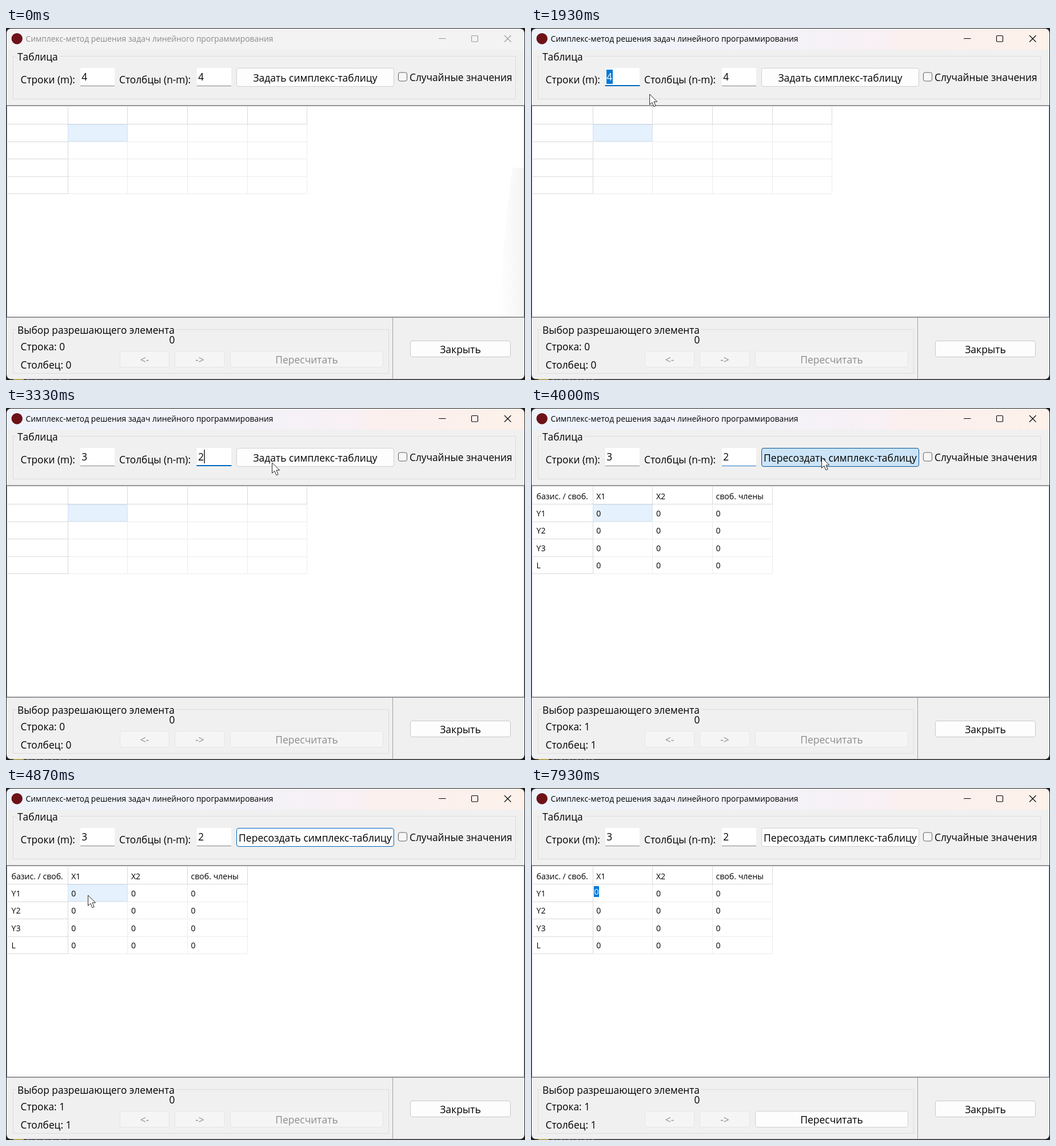
These frames come from a looping animation (908x617 px, 8000 ms). An HTML page:

```html
<!DOCTYPE html>
<html lang="ru">
<head>
<meta charset="utf-8">
<title>Симплекс-метод</title>
<style>
html, body { margin: 0; width: 100%; height: 100%; overflow: hidden; background: #202020; }
svg { display: block; width: 908px; height: 617px; }
text { font-family: "Open Sans", "Noto Sans", sans-serif; white-space: pre; }
</style>
</head>
<body>
<svg id="stage" viewBox="0 0 908 617" xmlns="http://www.w3.org/2000/svg">
  <defs>
    <linearGradient id="mica">
      <stop offset="0" stop-color="#eef3fb"/>
      <stop offset=".5" stop-color="#f4f2f8"/>
      <stop offset=".68" stop-color="#f8f0f4"/>
      <stop offset=".7" stop-color="#fbefef"/>
      <stop offset="1" stop-color="#fdf1ea"/>
    </linearGradient>
    <linearGradient id="shade">
      <stop offset="0" stop-color="#fff"/>
      <stop offset="1" stop-color="#f4f4f4"/>
    </linearGradient>
    <clipPath id="frame"><rect x="1" y="1" width="906" height="614.5" rx="8"/></clipPath>
  </defs>
  <g id="backdrop"></g>
  <g id="window" clip-path="url(#frame)"></g>
  <g id="pointer"></g>
</svg>
<script>
const LOOP = 8000, STEP = 200 / 3;
const BIG = 17.3, CAPTION = 17.5, SMALL = 14.1, TITLE = 13.86;
const BLUE = '#0067c0', SELECT = '#0078d7';
const byId = id => document.getElementById(id);

// Moments of the user's actions, ms
const AT = {
  show: 65, activate: 1000, dragOne: 1530, selectOne: 1600, dropOne: 1800, typeRows: 2400,
  focusTwo: 2730, selectTwo: 3000, typeCols: 3265, hover: 3390, press: 3865,
  build: 3930, release: 4065, edit: 7195, caretOff: 7730, hide: 7930
};

// Pointer path: time, x, y
const PATH = [
  [67, 400, 17], [330, 340, 47], [600, 228, 88], [867, 154, 85], [933, 150, 84],
  [1467, 150, 84], [1600, 126, 86], [1733, 105, 92], [1933, 207, 115], [2130, 262, 117],
  [2333, 304, 100], [2400, 304, 100], [2600, 342, 85], [2733, 362, 84], [2900, 362, 84],
  [3133, 321, 88], [3200, 321, 88], [3267, 400, 93], [3333, 465, 95], [3600, 508, 86],
  [4067, 508, 86], [4667, 198, 203], [4867, 143, 187]
];

const clamp = v => Math.max(0, Math.min(1, v));
const ramp = (t, start, span) => clamp((t - start) / span);

function mix(a, b, k) {
  const part = (c, i) => parseInt(c.slice(i, i + 2), 16);
  return `rgb(${[1, 3, 5].map(i => Math.round(part(a, i) + (part(b, i) - part(a, i)) * k))})`;
}

function pointerAt(t) {
  const i = PATH.findIndex(p => p[0] > t);
  if (i < 0) return PATH[PATH.length - 1].slice(1);
  if (i === 0) return PATH[0].slice(1);
  const [t0, x0, y0] = PATH[i - 1], [t1, x1, y1] = PATH[i], k = (t - t0) / (t1 - t0);
  return [x0 + (x1 - x0) * k, y0 + (y1 - y0) * k];
}

const rect = (x, y, w, h, fill, extra = '') =>
  `<rect x="${x}" y="${y}" width="${w}" height="${h}" fill="${fill}" ${extra}/>`;
const path = (d, stroke, width = 1, extra = '') =>
  `<path d="${d}" fill="none" stroke="${stroke}" stroke-width="${width}" ${extra}/>`;
const label = (x, y, s, size = BIG, fill = '#000', anchor = 'start') =>
  `<text x="${x}" y="${y}" font-size="${size}" fill="${fill}" text-anchor="${anchor}">${s.replace('<', '&lt;').replace('>', '&gt;')}</text>`;

function button(x, y, w, h, caption, look = {}) {
  const { fill = '#fdfdfd', border = '#d0d0d0', ink = '#000' } = look;
  return rect(x + .5, y + .5, w - 1, h - 1, fill, `rx="3.5" stroke="${border}"`)
    + label(x + w / 2, y + h / 2 + 7, caption, CAPTION, ink, 'middle');
}

function group(x, y, w, h, gapEnd, caption) {
  return path(`M18 ${y}H${x}V${y + h}H${x + w}V${y}H${gapEnd}`, '#dcdcdc') + label(20, y + 7.5, caption);
}

function field(x, value, { focus = false, selected = false, caret = false, line } = {}) {
  return rect(x, 70, 60, 32, '#fff')
    + (focus ? rect(x - .5, 100, 61, 2, BLUE) : rect(x, 101, 60, 1, line || '#868686'))
    + (selected ? rect(x + 2, 73, 11, 25, SELECT) : '')
    + label(x + 2.3, 92, value, BIG, selected ? '#fff' : '#000')
    + (caret ? rect(x + 12.5, 73, 1.3, 24, '#000') : '');
}

function titleBar(active) {
  const ink = active ? '#000' : '#999';
  return rect(0, 0, 908, 38, active ? 'url(#mica)' : '#f3f3f3')
    + '<circle cx="19.2" cy="18.7" r="9.7" fill="#6e1219"/>'
    + label(34.5, 24.3, 'Симплекс-метод решения задач линейного программирования', TITLE, active ? '#000' : '#8c8c8c')
    + path('M757 18.5H769.5', ink)
    + `<rect x="814.5" y="13.5" width="11" height="10.5" rx="1.2" fill="none" stroke="${ink}" stroke-width="1.1"/>`
    + path('M872 13L883.5 24.5M883.5 13L872 24.5', ink, 1.1);
}

function table(t) {
  const built = t >= AT.build, editing = t >= AT.edit;
  const cols = built ? 4 : 5;
  const colX = i => Math.floor(3.6 + i * 104.6) + .5;
  const rowY = i => Math.round(138 + i * 30.4) + .5;
  const right = colX(cols), bottom = rowY(5);
  let out = rect(1.5, 136.5, 905, 370, '#fff', 'stroke="#828790"');
  if (t < AT.activate)
    out += '<path d="M906 245H886Q868 380 862 506H906Z" fill="url(#shade)"/>';
  for (let r = 1; r <= 5; r++)
    out += path(`M108 ${rowY(r)}H${right}`, r === 1 ? '#d9d9d9' : '#ececec')
      + path(`M3 ${rowY(r)}H108`, '#d9d9d9');
  for (let c = 1; c <= cols; c++)
    out += path(`M${colX(c)} 168V${bottom}`, c === 1 ? '#d9d9d9' : '#ececec')
      + path(`M${colX(c)} 138V169`, '#d9d9d9');
  if (!editing) out += rect(108.5, 169.5, 103.5, 29, '#e5f1fd', 'stroke="#cfe4f7"');
  if (!built) return out;

  const heads = ['базис. / своб.', 'X1', 'X2', 'своб. члены'];
  const sides = ['Y1', 'Y2', 'Y3', 'L'];
  const cellX = c => 9.5 + c * 104.7;
  heads.forEach((s, c) => out += label(cellX(c), 159.7, s, SMALL));
  sides.forEach((s, r) => {
    const y = 190 + r * 30.4;
    out += label(cellX(0), y, s, SMALL);
    for (let c = 1; c < 4; c++)
      if (!editing || r || c > 1) out += label(cellX(c), y, '0', SMALL);
  });
  if (editing) {
    out += rect(110, 172, 9, 19, SELECT) + label(110.5, 187, '0', SMALL, '#fff');
    if (t < AT.caretOff) out += rect(118, 171.5, 1.2, 19.5, '#000');
  }
  return out;
}

function mainButton(t) {
  const caption = t >= AT.build ? 'Пересоздать симплекс-таблицу' : 'Задать симплекс-таблицу';
  const hover = ramp(t, AT.hover, 200), calm = ramp(t, AT.release, 220);
  let fill = mix('#fdfdfd', '#e0eef9', hover), border = mix('#d0d0d0', '#0078d4', hover);
  if (t >= AT.press) { fill = '#cce4f7'; border = '#005499'; }
  if (t >= AT.release) { fill = mix('#cce4f7', '#fdfdfd', calm); border = mix('#005499', '#0067c0', calm); }
  if (t >= AT.edit) border = mix('#0067c0', '#d0d0d0', ramp(t, AT.edit, 200));
  return button(403, 70, 276, 33, caption, { fill, border });
}

function topPanel(t) {
  const inOne = t >= AT.activate && t < AT.focusTwo;
  const inTwo = t >= AT.focusTwo && t < AT.build;
  const rows = t < AT.typeRows ? '4' : '3', columns = t < AT.typeCols ? '4' : '2';
  const one = {
    focus: inOne,
    selected: t >= AT.selectOne && t < AT.typeRows,
    caret: inOne && (t < AT.dragOne || t >= AT.typeRows)
  };
  const two = {
    focus: inTwo,
    selected: t >= AT.selectTwo && t < AT.typeCols,
    caret: inTwo && (t < AT.selectTwo || t >= AT.typeCols && t < 3800),
    line: t >= AT.build ? mix('#2b78c0', '#868686', ramp(t, AT.build + 70, 130)) : ''
  };
  return rect(0, 38, 908, 98, '#f0f0f0')
    + group(12.5, 49.5, 879, 75, 93, 'Таблица')
    + label(25.5, 97, 'Строки (m):') + field(130, rows, one)
    + label(198, 97, 'Столбцы (n-m):') + field(334, columns, two)
    + mainButton(t)
    + rect(686.5, 78, 15, 15, '#f7f7f7', 'rx="3" stroke="#626262"')
    + label(706, 93, 'Случайные значения')
    + path('M1 135.5H907', '#a0a0a0');
}

function bottomPanel(t) {
  const index = t >= AT.build ? 1 : 0, on = ramp(t, AT.edit - 65, 270);
  const off = { fill: '#f5f5f5', border: '#e6e6e6', ink: '#8d8d8d' };
  const recount = {
    fill: mix('#f5f5f5', '#fdfdfd', on),
    border: mix('#e6e6e6', '#d0d0d0', on),
    ink: on > 0 ? '#000' : off.ink
  };
  return rect(0, 507, 908, 110, '#f0f0f0')
    + path('M1 507.5H907', '#a0a0a0')
    + path('M676.5 508V615', '#a0a0a0')
    + group(12.5, 528.5, 657, 77, 297, 'Выбор разрешающего элемента')
    + label(285.5, 553, '0')
    + label(25.5, 565, 'Строка: ' + index)
    + label(25.5, 597, 'Столбец: ' + index)
    + button(199, 566, 87, 29, '<-', off)
    + button(295, 566, 88, 29, '->', off)
    + button(392, 566, 268, 29, 'Пересчитать', recount)
    + button(707, 548, 176, 29, 'Закрыть', { border: '#c8c8c8' });
}

function pointer(t) {
  if (t < AT.show || t >= AT.hide) return '';
  let [x, y] = pointerAt(t);
  const overField = y > 70 && y < 102 && (x > 130 && x < 190 || x > 334 && x < 394);
  const dragging = t >= AT.activate && t < AT.dropOne || t >= AT.focusTwo && t < AT.typeCols;
  const editing = t >= AT.edit - 65;
  if (editing) [x, y] = [148, 190];
  x = Math.round(x);
  y = Math.round(y);
  if (editing || overField || dragging) {
    const beam = `M${x - 4} ${y - 9.5}h3l1 1l1 -1h3M${x} ${y - 9}v18M${x - 4} ${y + 9.5}h3l1 -1l1 1h3`;
    return path(beam, '#fff', 3) + path(beam, '#000', 1.5);
  }
  return `<path transform="translate(${x} ${y})" d="M.6 1V19.3L4.8 15.3L8 22.8L11.2 21.4L8 14.1H13.6Z" fill="#fff" stroke="#222"/>`;
}

byId('backdrop').innerHTML = rect(0, 0, 908, 617, '#202020')
  + rect(13, 615, 18, 2, '#a8922c')
  + path('M36 616.3H110', '#777', 1, 'stroke-dasharray="5 3 2 4"');

let shown = -1;
function draw(time) {
  const step = Math.floor((time % LOOP + 5) / STEP) % (LOOP / STEP);
  if (step === shown) return;
  shown = step;
  const t = step * STEP;
  byId('window').innerHTML = titleBar(t >= AT.activate) + topPanel(t) + bottomPanel(t) + table(t);
  byId('pointer').innerHTML = pointer(t);
}

let start;
function tick(now) {
  start ??= now;
  draw(now - start);
  requestAnimationFrame(tick);
}
draw(0);
requestAnimationFrame(tick);
</script>
</body>
</html>
```
